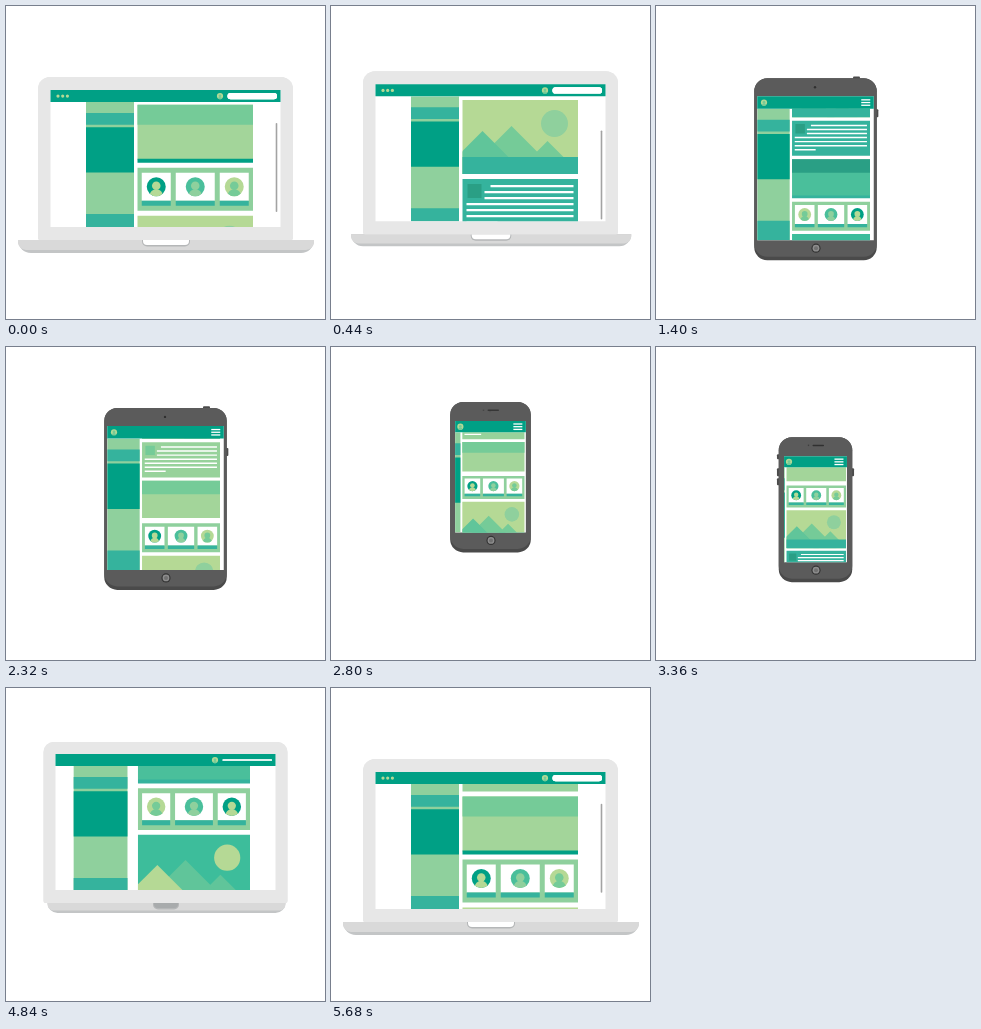
An HTML page with a canvas for the animation above (5.72 s loop, 319 by 313 pixels).

```html
<!DOCTYPE html>
<html lang="en">
<head>
<meta charset="utf-8">
<title>Responsive layout</title>
<style>
html, body { margin: 0; width: 100%; height: 100%; overflow: hidden; background: #fff; }
canvas { display: block; }
</style>
</head>
<body>
<canvas id="stage" width="319" height="313"></canvas>
<script>
const ctx = document.getElementById('stage').getContext('2d');
const LOOP = 5720, CENTER = 159.5, APEX = 54, OVERSHOOT = 2.2;
const DARK = '#00a085', DEEP = '#2a9f85', TEAL = '#35b39d', MINT = '#4abf9b',
      LEAF = '#75cb98', LIGHT = '#8fd09d', PALE = '#a3d59a', LIME = '#b5d995';

// side, top and foot are the bezel; column, gap and bar lay out the page;
// line, spread and menu shape the search field that turns into a menu icon
const laptop = { w: 255, h: 163, side: 12.5, top: 13, foot: 13, head: 12, right: 247, scale: 1, gap: 3.5, bar: 48,
  avatar: 214, menu: 49.5, line: 6.4, spread: 0, radius: 12, grey: 231 };
const lid = { ...laptop, w: 244, h: 161, side: 12, top: 12, right: 244, scale: .97, gap: 10.8, bar: 55.5,
  avatar: 209, line: 1, radius: 10 };
const wide = { ...laptop, w: 202, h: 171, side: 9, top: 15, foot: 17, right: 234, scale: .87,
  avatar: 171, menu: 4, line: 1.3, spread: 1.6, grey: 178 };
const tall = { ...wide, w: 122.5, h: 182, side: 3, top: 18, foot: 20, head: 12.5, right: 214, scale: .675,
  avatar: 108, menu: 9, spread: 2.7, radius: 13, grey: 91 };
const phone = { ...tall, w: 73.5, h: 145, side: 5.3, top: 19, head: 11.2, right: 190, scale: .515, avatar: 133 };
const devices = [laptop, wide, tall, phone, lid, laptop];

// start and length of each change of device
const morphs = [[520, 280], [880, 300], [2480, 480], [4200, 640], [4840, 400]];
// rise start and length, fall start and length, resting height
const hops = [[340, 260, 1180, 220, 70], [2130, 350, 2740, 600, 88], [4080, 520, 4920, 430, 71]];
// start, length and distance of each scroll
const runs = [[0, 648, 162], [1354, 1126, 317], [3195, 1105, 305], [4880, 840, 204]];

const clamp = p => Math.min(1, Math.max(0, p));
const smooth = p => p * p * (3 - 2 * p);
const cubic = p => p < .5 ? 4 * p ** 3 : 1 - 4 * (1 - p) ** 3;
const mix = (a, b, p) => a + (b - a) * p;
const ramp = (t, start, length, ease = smooth) => ease(clamp((t - start) / length));

function height(t) {
  let y = 71;
  for (const [up, rise, down, fall, rest] of hops) {
    y = mix(y, APEX, ramp(t, up, rise));
    y += (rest + OVERSHOOT - APEX) * ramp(t, down, fall) - OVERSHOOT * ramp(t, down + fall, 220);
  }
  return y;
}

function rect(color, x0, y0, x1, y1, r = 0) {
  if (x1 <= x0 || y1 <= y0) return;
  ctx.fillStyle = color;
  ctx.beginPath();
  ctx.roundRect(x0, y0, x1 - x0, y1 - y0, r);
  ctx.fill();
}

function disc(color, x, y, r) {
  ctx.fillStyle = color;
  ctx.beginPath();
  ctx.arc(x, y, r, 0, 7);
  ctx.fill();
}

function peak(color, x, y, floor) {
  ctx.fillStyle = color;
  ctx.beginPath();
  ctx.moveTo(x, y);
  ctx.lineTo(x - floor + y, floor);
  ctx.lineTo(x + floor - y, floor);
  ctx.fill();
}

function clipped(x0, y0, x1, y1, draw) {
  ctx.save();
  ctx.beginPath();
  ctx.rect(x0, y0, x1 - x0, y1 - y0);
  ctx.clip();
  draw();
  ctx.restore();
}

function faded(alpha, draw) {
  ctx.save();
  ctx.globalAlpha = clamp(alpha);
  draw();
  ctx.restore();
}

function person(x, y, r, back, front) {
  disc(back, x, y, r);
  ctx.save();
  ctx.beginPath();
  ctx.arc(x, y, r, 0, 7);
  ctx.clip();
  disc(front, x, y - r * .1, r * .45);
  disc(front, x, y + r * .95, r * .7);
  ctx.restore();
}

// Cards are drawn in a column W units wide
const W = 115.5;

function textCard(teal) {
  rect(teal ? TEAL : '#97d29b', 0, 0, W, 52);
  rect(teal ? DEEP : LEAF, 5, 5, 19, 19);
  for (let i = 0; i < 7; i++) {
    const x = i == 0 ? 28 : i < 3 ? 22 : 4, y = 7 + i * 6;
    rect('#fff', x, y - 1.1, i == 6 ? 35 : 111, y + 1.1);
  }
}

function bannerCard(teal, onLaptop) {
  rect(teal ? MINT : PALE, 0, 0, W, 55);
  rect(teal ? DEEP : LEAF, 0, 0, W, 20);
  faded(teal ? 1 : onLaptop, () => rect(teal ? TEAL : DARK, 0, 54, W, 58));
}

function peopleCard(teal) {
  rect(LIGHT, 0, 0, W, 43);
  const looks = [[DARK, LIME], [MINT, LIGHT], [LIME, LEAF]];
  if (teal) looks.reverse();
  looks.forEach((look, i) => {
    const x = W / 2 + (i - 1) * 39, half = i == 1 ? 19.5 : 14.5;
    rect('#fff', x - half, 5, x + half, 33);
    rect(TEAL, x - half, 33, x + half, 38);
    person(x, 19, 9.5, ...look);
  });
}

function sceneCard(teal) {
  const back = teal ? '#60c59a' : LEAF;
  rect(teal ? '#3dbd9b' : LIME, 0, 0, W, 74);
  disc(teal ? LIME : LIGHT, 92, 23.5, 13.5);
  clipped(0, 0, W, 74, () => {
    peak(back, 85, 41, 74);
    peak(back, 49, 26, 74);
    peak(teal ? LIME : '#60c59a', 20, 31, 74);
  });
  rect(teal ? LIGHT : TEAL, 0, 57, W, 74);
}

const cards = [[textCard, 52], [bannerCard, 58], [peopleCard, 43], [sceneCard, 74]];

function feed(x, y, scale, scroll, size, onLaptop) {
  ctx.save();
  ctx.translate(x, y);
  ctx.scale(scale, scale);
  ctx.translate(0, -scroll);
  for (let i = 0, top = 0; top < scroll + size / scale; i++) {
    const [draw, h] = cards[i % 4];
    draw(i % 8 < 4, onLaptop);
    ctx.translate(0, h + 5);
    top += h + 5;
  }
  ctx.restore();
}

function sidebar(x0, x1, y, bottom) {
  rect(LIGHT, x0, y, x1, bottom);
  rect(TEAL, x0, y + 11, x1, y + 22.8);
  rect(DARK, x0, y + 25.2, x1, y + 70.5);
  rect(TEAL, x0, y + 112, x1, bottom);
}

function keyboard(t, x0, x1, y) {
  const size = 1 - ramp(t, 600, 140) + ramp(t, 4560, 220);
  const open = 1 - ramp(t, 340, 260) + ramp(t, 4840, 380);
  const a = mix(x0 + 4, x0 - 20, open), b = mix(x1 - 2, x1 + 21, open);
  const h = mix(10, 13, open) * size, n = mix(13, 24, open);
  rect('#c3c5c6', a, y, b, y + h, [0, 0, h, h]);
  rect('#d9d9d9', a, y, b, y + h * .76, [0, 0, h * .6, h * .6]);
  rect('#b5b7b8', 160 - n, y, 160 + n, y + 6.5 * size, [0, 0, 5, 5]);
  rect(open > .5 ? '#fff' : '#a8abac', 161 - n, y, 159 + n, y + 5 * size, [0, 0, 4, 4]);
}

function buttons(t, x0, x1, y) {
  const ink = '#4b4b4b';
  const onTall = 1.6 * (ramp(t, 1180, 220) - ramp(t, 2400, 80));
  const onPhone = 1.8 * (ramp(t, 2960, 240) - ramp(t, 4060, 140));
  const key = (d, a, b) => rect(ink, d < 0 ? x0 + d : x1 - 2, y + a, d < 0 ? x0 + 2 : x1 + d, y + b, 1);
  if (onTall) {
    const slide = 9 * ramp(t, 1400, 240);
    rect(ink, 197, y - onTall, 204, y + 2, 1);
    key(onTall, 31 + slide, 39 + slide);
  }
  if (onPhone) {
    key(onPhone, 31, 39);
    key(-onPhone, 17, 22);
    key(-onPhone, 31, 39);
    key(-onPhone, 41, 48);
  }
}

function frame(t) {
  const m = morphs.reduce((sum, [start, length]) => sum + ramp(t, start, length, cubic), 0);
  const i = Math.min(4, Math.floor(m)), d = {};
  for (const k in laptop) d[k] = mix(devices[i][k], devices[i + 1][k], m - i);
  const y = height(t);
  const scroll = runs.reduce((sum, [start, length, way]) => sum + way * ramp(t, start, length, p => p), 301);

  const near = k => clamp(1 - Math.abs(m - k));
  const onLaptop = clamp(1 - 4 * Math.min(m, 5 - m));
  const dark = clamp((178 - d.grey) / 87);
  const tone = v => `rgb(${v},${v},${v})`;
  const x0 = CENTER - d.w / 2, x1 = CENTER + d.w / 2, end = y + d.h;
  const left = x0 + d.side, right = x1 - d.side, top = y + d.top, bottom = end - d.foot;
  const page = top + d.head, column = d.right - W * d.scale;

  rect('#fff', 0, 0, 319, 313);
  keyboard(t, x0, x1, end);
  buttons(t, x0, x1, y);
  const low = m < .4 || m > 3.6 ? 2 : d.radius;
  const corners = [d.radius, d.radius, low, low];
  rect(tone(d.grey - 17 * dark), x0, y, x1, end, corners);
  rect(tone(d.grey), x0, y, x1, end - 3.5 * dark, corners);

  rect('#fff', left, top, right, bottom);
  clipped(left, page, right, bottom, () => {
    const edge = column - d.gap * d.scale;
    sidebar(edge - d.bar * d.scale, edge, page, bottom);
    feed(column, page, d.scale, scroll % 494, bottom - page, onLaptop);
    faded(onLaptop, () => {
      const thumb = top + 33 + ((scroll + 494) % 988 - 795) * .12;
      rect('#a3a3a3', right - 4.8, thumb, right - 3.2, thumb + 89, 1);
    });
  });

  const mid = top + d.head / 2 + .1;
  rect(DARK, left, top, right, page);
  faded(onLaptop, () => {
    for (let k = 0; k < 3; k++) disc(LIME, left + 7.5 + k * 4.7, mid, 1.6);
  });
  person(d.avatar, mid, 3.1, LIME, LEAF);
  for (const k of [-1, 0, 1]) {
    const ly = mid + k * d.spread - 1.5 * near(1), half = d.line / 2;
    rect('#fff', right - 3.5 - d.menu, ly - half, right - 3.5, ly + half, d.spread > 2 ? 0 : half);
  }

  faded(near(1), () => {
    rect('#f4f4f4', 155.5, end - 8, 163.5, end - 6.2, 1);
    disc('#555', 159, y + 7, 1);
  });
  faded(near(2) + near(3), () => {
    disc('#343434', 160, end - 12, 4.6);
    disc('#8d8d8d', 160, end - 12, 3.4);
    disc('#707070', 160, end - 12, 2);
  });
  faded(near(2), () => disc('#303030', 159, y + 9, 1.2));
  faded(near(3), () => {
    rect('#303030', 156.5, y + 7.5, 168, y + 9, 1);
    disc('#404040', 152.5, y + 8.2, .8);
  });
}

function tick() {
  frame(performance.now() % LOOP);
  requestAnimationFrame(tick);
}
tick();
</script>
</body>
</html>
```
